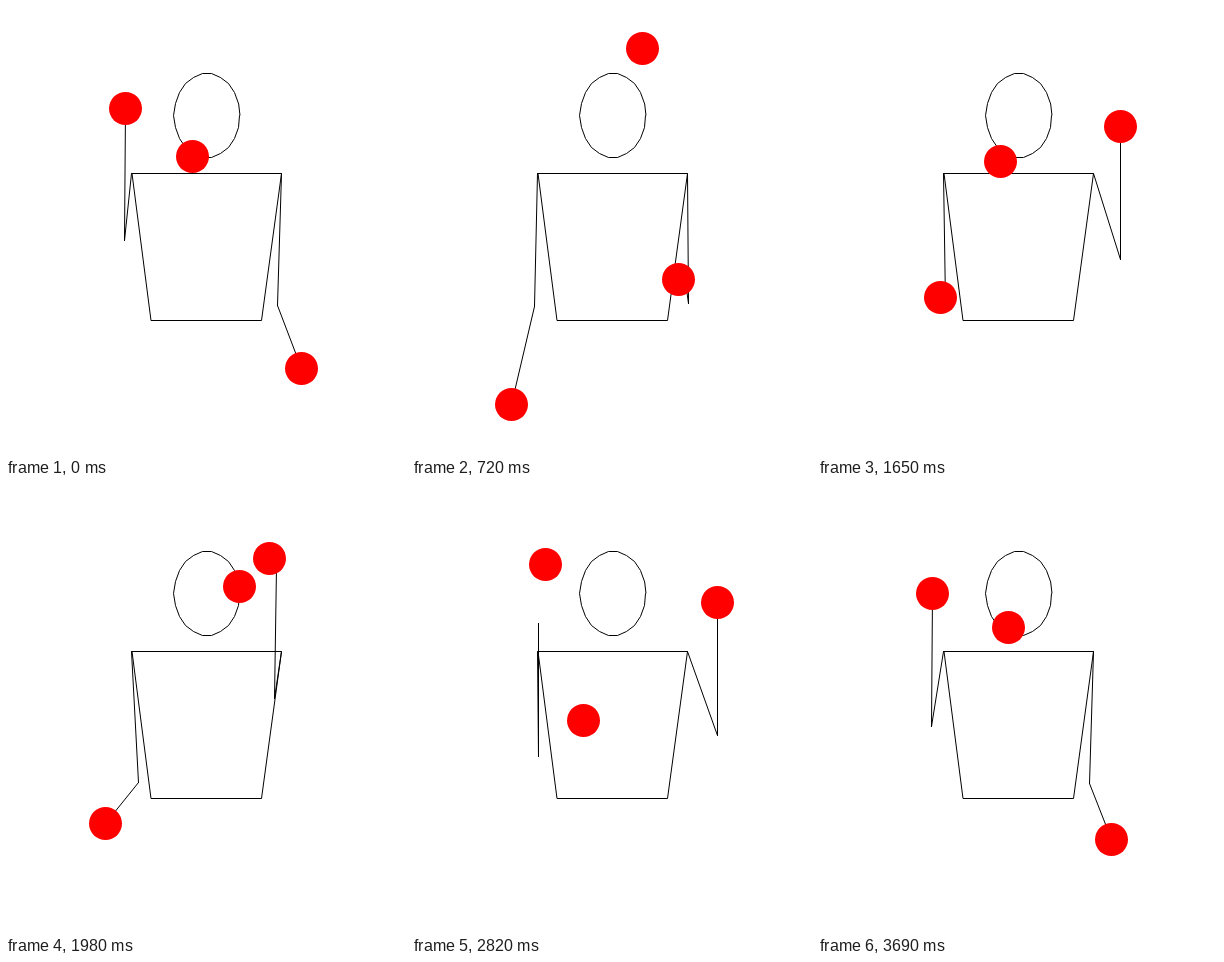
An HTML page with a canvas that plays this animation: 400 px wide and 450 px high, repeating every 3.72 s.

```html
<!DOCTYPE html>
<html lang="en">
<head>
<meta charset="utf-8">
<title>Juggler</title>
<style>
  html, body { margin: 0; width: 100%; height: 100%; overflow: hidden; background: #fff; }
  canvas { display: block; }
</style>
</head>
<body>
<canvas id="stage" width="400" height="450"></canvas>
<script>
const ctx = document.getElementById('stage').getContext('2d');

// Lengths in centimetres, times in seconds.
const SCALE = 3.25, CENTER_X = 200, GROUND_Y = 297.2;
const BEAT = 0.62, FLIGHT = 1.7 * BEAT, GRAVITY = 154;
const LOOP = 3720, STEP = 30;
const REACH = 25, DEPTH = 30, ARM = 41;
const SHOULDER = { x: 23, z: 40 };
const EMPTY = FLIGHT - BEAT, HOLD = 2 * BEAT - EMPTY;

// Height of each throw; left and right hands alternate.
const LEVELS = [60, 0, 0, 60, 0, 60];
const level = n => LEVELS[n % 6];
const mod = (a, b) => ((a % b) + b) % b;
const side = n => (n % 2 ? 1 : -1);
const toScreen = p => [Math.round(CENTER_X + SCALE * p.x), Math.round(GROUND_Y - SCALE * p.z)];

// A ball thrown on beat n lands at the level of its next throw, three beats later.
function launch(n) {
  return {
    x: -side(n) * 2 * REACH / FLIGHT,
    z: (level(n + 3) - level(n)) / FLIGHT + GRAVITY * FLIGHT / 2
  };
}

function flightPosition(n, u) {
  const v = launch(n);
  return { x: side(n) * REACH + v.x * u, z: level(n) + v.z * u - GRAVITY * u * u / 2 };
}

function hermite(a, b, va, vb, h, u) {
  const s = u / h, r = 1 - s;
  return a * (1 + 2 * s) * r * r + b * s * s * (3 - 2 * s) + h * (va * s * r * r - vb * s * s * r);
}

// Throw, catch, throw: a spline with continuous acceleration at the catch.
function carry(a, b, va, vb, u) {
  const bend = 6 * (b - a) / EMPTY ** 2 - 2 * va / EMPTY - 2 * vb / HOLD;
  const vc = bend / (4 / EMPTY + 4 / HOLD);
  return u < EMPTY
    ? hermite(a, b, va, vc, EMPTY, u)
    : hermite(b, b, vc, vb, HOLD, u - EMPTY);
}

function handPosition(hand, t) {
  const since = mod(t - hand * BEAT, 6 * BEAT);
  const n = hand + 2 * Math.floor(since / (2 * BEAT));
  const u = since % (2 * BEAT);
  const from = launch(n), to = launch(n + 2);
  const x = side(hand) * REACH;
  return {
    x: carry(x, x, from.x, to.x, u),
    z: carry(level(n), level(n + 2), from.z, to.z, u)
  };
}

function ballPosition(ball, t) {
  const since = mod(t - ball * BEAT, 6 * BEAT);
  const n = ball + 3 * Math.floor(since / (3 * BEAT));
  const u = since % (3 * BEAT);
  return u < FLIGHT ? flightPosition(n, u) : handPosition((n + 1) % 2, t);
}

// Two equal arm segments, with the elbow hanging below the line to the hand.
function elbowPosition(hand, p) {
  const x0 = side(hand) * SHOULDER.x;
  const dx = p.x - x0, dz = p.z - SHOULDER.z;
  const half = Math.hypot(dx, DEPTH, dz) / 2;
  const drop = Math.sqrt(Math.max(0, ARM * ARM - half * half));
  const tilt = Math.asin(dz / (2 * half));
  return {
    x: x0 + dx / 2 * (1 + drop * Math.tan(tilt) / half),
    z: SHOULDER.z + dz / 2 - drop * Math.cos(tilt)
  };
}

// Strokes run through pixel centres.
function stroke(points, closed) {
  ctx.beginPath();
  for (const [x, y] of points) ctx.lineTo(x + 0.5, y + 0.5);
  if (closed) ctx.closePath();
  ctx.stroke();
}

function disc([x, y]) {
  ctx.beginPath();
  ctx.arc(x + 0.5, y + 0.5, 16.5, 0, 2 * Math.PI);
  ctx.fill();
}

const torso = [[125, 167], [275, 167], [255, 314], [145, 314]];
const head = Array.from({ length: 22 }, (_, i) => {
  const a = i * Math.PI / 11;
  return [Math.round(200.4 + 33 * Math.cos(a)), Math.round(109 + 42.2 * Math.sin(a))];
});

function draw(t) {
  ctx.fillStyle = '#fff';
  ctx.fillRect(0, 0, 400, 450);
  ctx.strokeStyle = '#000';
  ctx.lineWidth = 1;
  ctx.lineCap = 'square';
  stroke(torso, true);
  stroke(head, true);
  for (const hand of [0, 1]) {
    const p = handPosition(hand, t);
    const elbow = toScreen(elbowPosition(hand, p));
    stroke([torso[hand], elbow]);
    stroke([elbow, toScreen(p)]);
  }
  ctx.fillStyle = '#f00';
  for (let ball = 0; ball < 3; ball++) disc(toScreen(ballPosition(ball, t)));
}

const start = performance.now();
function tick() {
  const ms = (performance.now() - start) % LOOP;
  draw(Math.floor(ms / STEP) * STEP / 1000);
  requestAnimationFrame(tick);
}
tick();
</script>
</body>
</html>
```
